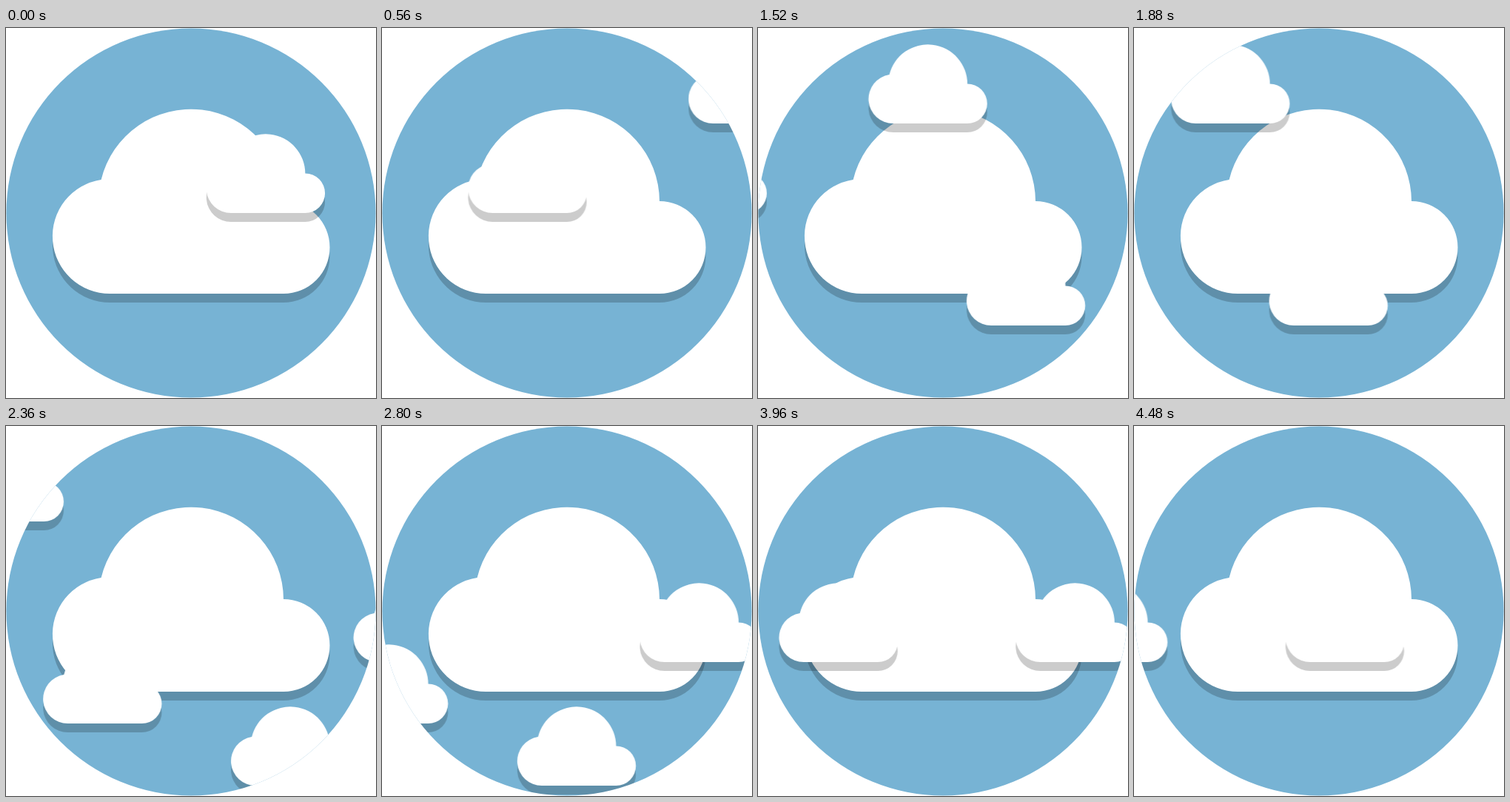
An HTML page for the animation above (4520 ms loop, 500 px wide and 500 px high).

```html
<!DOCTYPE html>
<html lang="en">
<head>
<meta charset="utf-8">
<title>Drifting clouds</title>
<style>
  html, body { margin: 0; width: 100%; height: 100%; overflow: hidden; background: #fff; }
  svg { display: block; width: 100%; height: 100%; }
  .sky { fill: #77b3d4; }
  .shade { fill: #000; opacity: .2; }
  .white { fill: #fff; }
  /* 113 steps of 40 ms; the small lead keeps each step clear of its edge */
  .drift { animation: drift 4520ms steps(113) -5ms infinite; }
  @keyframes drift { to { transform: translateX(-1246.6px); } }
</style>
</head>
<body>
<svg viewBox="0 0 500 500">
  <defs>
    <clipPath id="disc"><circle cx="250" cy="250" r="249.6"/></clipPath>
    <path id="cloud" d="M140.5 359A77.5 77.5 0 0 1 128.6 204.9A125 125 0 0 1 375 234A62.5 62.5 0 0 1 375 359Z"/>
    <!-- small cloud, origin at its lower left corner -->
    <g id="small" transform="scale(.428) translate(-63 -359)"><use href="#cloud"/></g>
    <g id="puff">
      <use class="shade" href="#small" y="12"/>
      <use class="white" href="#small"/>
    </g>
  </defs>
  <circle class="sky" cx="250" cy="250" r="249.6"/>
  <use class="shade" href="#cloud" y="12"/>
  <use class="white" href="#cloud"/>
  <g clip-path="url(#disc)">
    <g class="drift">
      <use href="#puff" x="270.8" y="250"/>
      <use href="#puff" x="568.6" y="129"/>
      <use href="#puff" x="701.1" y="402"/>
      <use href="#puff" x="955" y="486"/>
      <use href="#puff" x="1120.6" y="319"/>
      <use href="#puff" x="1440.4" y="319"/>
    </g>
  </g>
</svg>
</body>
</html>
```
